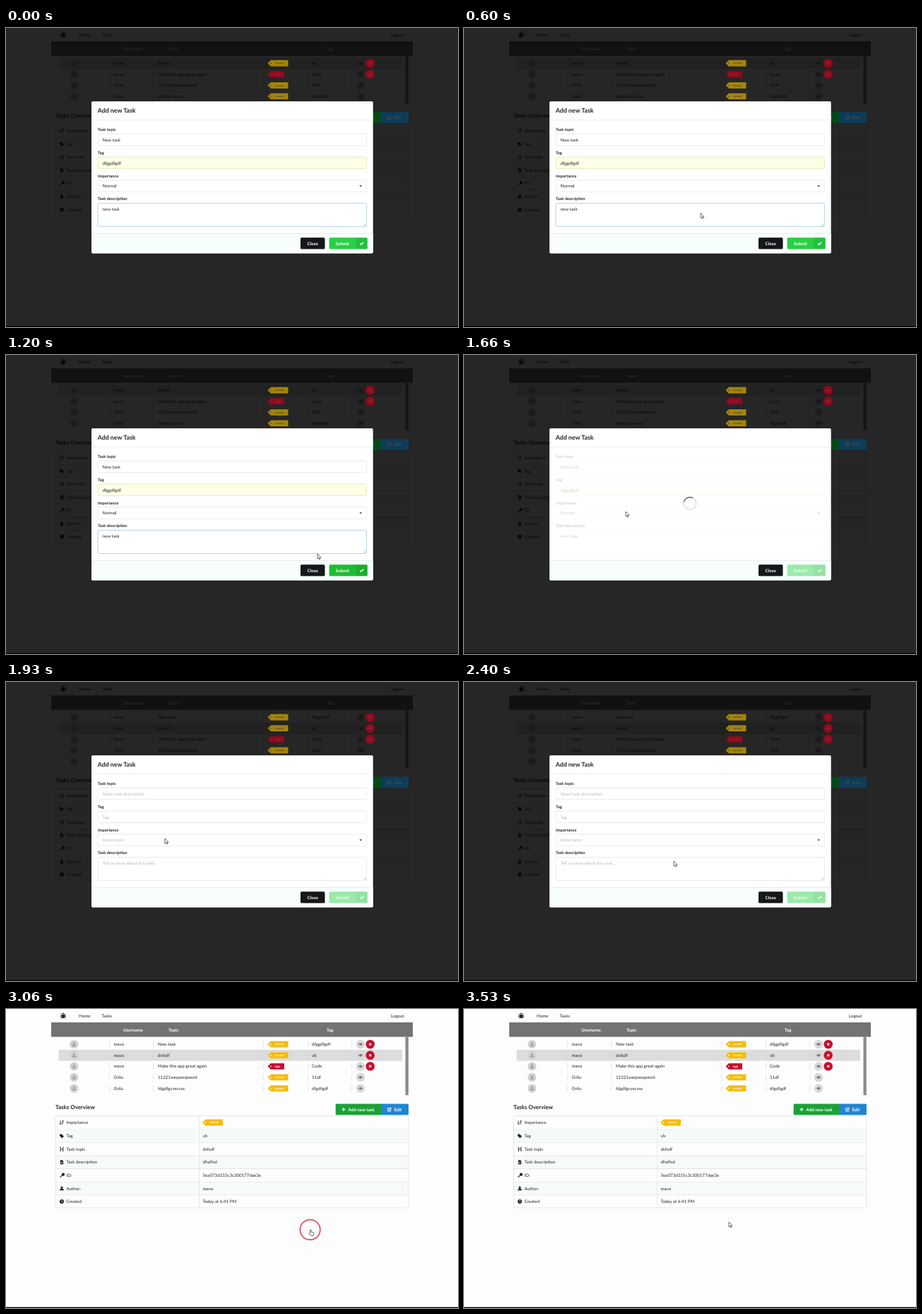
Animation, 640 px wide and 424 px high, one loop 3600 ms. Source, as an HTML page with a canvas:

```html
<!DOCTYPE html>
<html lang="en">
<head>
<meta charset="utf-8">
<title>Task manager</title>
<style>
html, body { margin: 0; width: 100%; height: 100%; overflow: hidden; background: #fdfdfd; }
canvas { display: block; width: 640px; height: 424px; }
</style>
</head>
<body>
<canvas id="stage"></canvas>
<script>
const stage = document.getElementById('stage');
const ratio = window.devicePixelRatio || 1;
stage.width = 640 * ratio;
stage.height = 424 * ratio;
const c = stage.getContext('2d');

const LOOP = 3600, TICK = 1000 / 15;
const INK = '#262626';
const LOAD = 19, SAVED = 28, CLOSED = 46;   // ticks at which the scene changes

const BRIGHT = { yellow: '#f6bd0b', red: '#c8102e', green: '#1da038', blue: '#2185d0', text: '#fff' };
const DIM = { yellow: '#a58408', red: '#97071d', green: '#04491a', blue: '#0d3c5a', text: '#4b4b45' };

const tasks = [
  ['mavo', 'New task', 'dfggdfgdf'],
  ['mavo', 'dsfsdf', 'vb'],
  ['mavo', 'Make this app great again', 'Code', true],
  ['Orilu', '11221weqweqwexit', '11df'],
  ['Orilu', 'fdgdfgcvxcvxc', 'dfgdfgdf']
];

// [tick, x, y] of the pointer tip
const pointerPath = [
  [6, 153, 191], [8, 250, 235], [10, 420, 290], [12, 478, 302], [13, 482, 302], [17, 482, 302],
  [19, 400, 262], [22, 260, 230], [25, 229, 222], [29, 225, 222], [30, 225, 222], [31, 222, 220],
  [35, 222, 220], [36, 297, 254], [38, 370, 290], [40, 420, 315], [43, 430, 312.5], [47, 430, 312.5],
  [49, 412, 310], [52, 382, 306], [53, 375, 302]
];

const icons = {
  sort: ['', 'M-2-2.6V2.6M-3.1 1.4L-2 2.6-.9 1.4M.2-2.2H3M.2-.6H2.4M.2 1H1.8M.2 2.5H1.2'],
  tag: ['M-3-2.6H-.2L3 .4.4 3-3-.3Z', ''],
  heading: ['', 'M-1.8-2.5V2.5M1.8-2.5V2.5M-1.8 0H1.8M-2.6-2.5H-1M1-2.5H2.6M-2.6 2.5H-1M1 2.5H2.6'],
  file: ['M-2.2-3H.8L2.2-1.6V3H-2.2ZM-1.2-.2V.4H1.2V-.2ZM-1.2 1.2V1.8H1.2V1.2Z', ''],
  key: ['M-2.9 2.3L.1-.7A2 2 0 1 1 1.3.6L.2 1.2-.5 1.9-1.3 2-1.4 2.9H-2.9Z', ''],
  user: ['M0-3A1.6 1.6 0 0 1 0 .3 1.6 1.6 0 0 1 0-3M-2.8 2.9C-2.8.4-1.5.4 0 .4S2.8.4 2.8 2.9Z', ''],
  clock: ['M0-3A3 3 0 0 1 0 3 3 3 0 0 1 0-3M-.3-2V.4L1.2 1.3 1.5.8.4 0V-2Z', ''],
  bug: ['M-1.8-2.2A1.8 1.9 0 0 1 1.8-2.2ZM-2.4-1.6H2.4V1.6C2.4 4.6-2.4 4.6-2.4 1.6Z',
    'M-2.2-.9L-4-2.6M2.2-.9L4-2.6M-2 .7H-4.5M2 .7H4.5M-2 2L-3.8 3.8M2 2L3.8 3.8'],
  eye: ['M0-.9A.9.9 0 0 1 0 .9.9.9 0 0 1 0-.9', 'M-2.6 0Q0-3 2.6 0Q0 3-2.6 0'],
  cross: ['', 'M-1.4-1.4L1.4 1.4M1.4-1.4L-1.4 1.4'],
  plus: ['', 'M-2.5 0H2.5M0-2.5V2.5'],
  edit: ['M-.8.1L2-2.8 3-1.8.2 1-1.1 1.3Z', 'M.4-2H-2.6V2.5H1.9V.8'],
  check: ['', 'M-2.5.1L-.8 1.8 2.5-1.7'],
  arrow: ['M0 0V7L1.6 5.6 2.7 8 3.8 7.5 2.8 5.2H5Z', ''],
  hand: ['M.7.5Q1.4-.2 2 .6V3.6L5.2 4.3Q6 4.6 5.8 5.6L5 9H1.8L-.6 6.2Q-.8 5 .7 5.6Z', '']
};

function rect(x, y, w, h, fill, r = 0, border) {
  c.beginPath();
  c.roundRect(x, y, w, h, r);
  if (fill) { c.fillStyle = fill; c.fill(); }
  if (border) { c.strokeStyle = border; c.lineWidth = .6; c.stroke(); }
}

function disc(x, y, r, fill) {
  c.beginPath();
  c.arc(x, y, r, 0, 7);
  c.fillStyle = fill;
  c.fill();
}

function ring(x, y, r, color, width, from = 0, to = 7) {
  c.beginPath();
  c.arc(x, y, r, from, to);
  c.strokeStyle = color;
  c.lineWidth = width;
  c.stroke();
}

// y is the middle of the line of text
function text(s, x, y, color = INK, weight = 400, size = 6.2, align = 'left') {
  c.font = `${weight} ${size}px Lato, sans-serif`;
  c.textAlign = align;
  c.fillStyle = color;
  c.fillText(s, x, y + size * .34);
}
const bold = (s, x, y, color, size, align) => text(s, x, y, color, 700, size, align);

function icon(name, x, y, color = INK, width = .9, outline) {
  const [solid, line] = icons[name];
  c.save();
  c.translate(x, y);
  c.lineWidth = width;
  c.strokeStyle = outline || color;
  c.fillStyle = color;
  const shape = new Path2D(solid);
  c.fill(shape, 'evenodd');
  if (outline) c.stroke(shape);
  c.stroke(new Path2D(line));
  c.restore();
}

function label(x, y, high, p) {
  const end = x + (high ? 23.5 : 29);
  c.beginPath();
  [[x, y], [x + 4.5, y - 4.4], [end, y - 4.4], [end, y + 4.4], [x + 4.5, y + 4.4]]
    .forEach(q => c.lineTo(...q));
  c.fillStyle = high ? p.red : p.yellow;
  c.fill();
  disc(x + 4.2, y, .9, p.text);
  bold(high ? 'high' : 'normal', (x + end) / 2 + 2.2, y, p.text, 3.9, 'center');
}

const rowY = i => 50 + i * 15.65;

// Saturated parts, which stay visible under the dimmer
function accents(rows, dy, p) {
  rows.forEach((task, i) => {
    const y = rowY(i);
    label(370.5, y, task[3], p);
    if (task[0] === 'mavo') {
      disc(515.7, y, 6.3, p.red);
      icon('cross', 515.7, y, p.text, 1.2);
    }
  });
  const y = 142.4 + dy;
  rect(466.7, y - 7.8, 66, 15.6, p.green, 1.5);
  rect(531, y - 7.8, 39, 15.6, p.blue, [0, 1.5, 1.5, 0]);
  icon('plus', 478, y, p.text, 1.2);
  bold('Add new task', 484.5, y, p.text);
  icon('edit', 543, y, p.text);
  bold('Edit', 549.5, y, p.text);
  label(278, 161 + dy, false, p);
}

function page(rows, dy) {
  rect(0, 0, 640, 424, '#fdfdfd');
  icon('bug', 81, 9.5);
  text('Home', 103, 10);
  text('Tasks', 135.5, 10);
  text('Logout', 545, 10);

  rect(64, 19, 512, 20.4, '#737373');
  bold('Username', 166, 29.5, '#fff');
  bold('Topic', 230, 29.5, '#fff');
  bold('Tag', 454, 29.5, '#fff');
  rows.forEach(([name, topic, tag], i) => {
    const y = rowY(i);
    if (topic === 'dsfsdf') rect(74.5, y - 7.8, 486.5, 15.7, '#dcdcdc');
    disc(96.3, y, 6.1, '#d2d2d2');
    icon('user', 96.3, y, '#a4a4a4');
    for (const x of [146.5, 208.5, 364.5, 427.5, 489.5]) rect(x, y - 4.5, .6, 9, '#cfcfcf');
    text(name, 152.5, y);
    text(topic, 215, y);
    text(tag, 433, y);
    disc(502, y, 6.2, '#d8d8d8');
    icon('eye', 502, y, '#555', .8);
  });
  rect(565.5, 39.4, 4.3, 82.8 + dy, '#8a8a8a');

  bold('Tasks Overview', 70, 139.7 + dy, INK, 8);
  const facts = [
    ['sort', 'Importance', ''], ['tag', 'Tag', 'vb'], ['heading', 'Task topic', 'dsfsdf'],
    ['file', 'Task description', 'dfsdfsd'], ['key', 'ID:', '5ea073d315c3c300177dae3e'],
    ['user', 'Author:', 'mavo'], ['clock', 'Created', 'Today at 6:41 PM']
  ];
  facts.forEach(([mark, title, value], i) => {
    const y = (i ? 161.65 + i * 18.55 : 161) + dy;
    if (i % 2) rect(70.3, y - 9.3, 499.5, 18.6, '#f6fbfa');
    if (i) rect(70.3, y - 9.5, 499.5, .6, '#dedede');
    icon(mark, 79, y);
    text(title, 85.5, y);
    text(value, 278.5, y);
  });
  rect(70.3, 151.4 + dy, 499.5, 130.6, null, 1.5, '#d6d6d6');
  rect(273.2, 151.4 + dy, .6, 130.6, '#dedede');
}

function field(title, y, h, value, hint, fill = '#fff', border = '#dcdcdc') {
  bold(title, 130, y - 6, INK, 5.75);
  rect(130, y, 380.4, h, fill, 1.6, border);
  text(value || hint, 136.5, y + 8.4, value ? INK : '#b9b9b9');
}

function modal(k, t) {
  const saved = k >= SAVED, loading = k >= LOAD && !saved;
  const fill = s => saved ? '' : s;
  rect(121, 104, 398.7, 215.6, '#fff', 1.8);
  bold('Add new Task', 129.7, 117.2, INK, 8.8);
  rect(121, 130.4, 398.7, .6, '#dcdcdc');

  field('Task topic', 150.2, 16.5, fill('New task'), 'Short task description');
  field('Tag', 183, 16.5, fill('dfggdfgdf'), 'Tag', saved ? '#fff' : '#fdffe6', saved ? undefined : '#dfdc9e');
  field('Importance', 215.8, 16.5, fill('Normal'), 'Importance');
  field('Task description', 248.5, 33, fill('new task'), 'Tell us more about this task..', '#fff', k < LOAD ? '#85b7d9' : undefined);
  c.fillStyle = INK;
  c.fill(new Path2D('M500.3 223.2H504L502.15 225.2Z'));
  c.strokeStyle = '#888';
  c.lineWidth = .5;
  c.stroke(new Path2D('M506.3 280.5L509.5 277.3M508.2 280.5L509.5 279.2'));

  if (loading) {
    rect(127, 140, 386, 143, 'rgba(255,255,255,.8)');
    const a = (t - 1660) / 600 * 2 * Math.PI;
    ring(320, 210.5, 8.8, '#dedede', 1.5);
    ring(320, 210.5, 8.8, '#6e6e6e', 1.5, a - 2.9, a - 1.1);
  }

  rect(121, 291.3, 398.7, 28.3, '#f8fefd', [0, 0, 1.8, 1.8]);
  rect(121, 291, 398.7, .6, '#dcdcdc');
  rect(417, 297.2, 34.5, 16.4, k >= 42 ? '#27292a' : '#161718', 1.7);
  bold('Close', 434.2, 305.4, '#fff', 6.2, 'center');

  c.save();
  if (k >= LOAD) c.globalAlpha = .45;
  rect(457.6, 297.2, 54.2, 16.4, k >= 12 && k < LOAD ? '#1ebc30' : '#29d046', 1.7);
  rect(495.4, 297.2, 16.4, 16.4, 'rgba(0,0,0,.08)', [0, 1.7, 1.7, 0]);
  c.globalAlpha = k >= LOAD ? .85 : 1;
  bold('Submit', 476.4, 305.4, '#fff', 6.2, 'center');
  icon('check', 503.7, 305.4, '#fff', 1.3);
  c.restore();
}

function pointer(k) {
  if (k < pointerPath[0][0]) return;
  const i = Math.max(1, pointerPath.findIndex(p => p[0] >= k));
  const [k0, x0, y0] = pointerPath[i - 1], [k1, x1, y1] = pointerPath[i];
  const f = (k - k0) / (k1 - k0);
  const x = x0 + (x1 - x0) * f, y = y0 + (y1 - y0) * f;
  const hand = k >= 12 && k <= 17 || k >= 42 && k <= 47;
  icon(hand ? 'hand' : 'arrow', x, y, '#fff', .8, '#444');
}

function clickRing(k, start, x, y) {
  const alpha = [1, .72, .45, .2][k - start];
  if (alpha) ring(x, y, 14.2, `rgba(205,16,42,${alpha})`, 1.7);
}

function draw() {
  const t = performance.now() % LOOP;
  const k = Math.min(53, Math.floor((t + 7) / TICK));
  const saved = k >= SAVED, open = k < CLOSED;
  const rows = saved ? tasks : tasks.slice(1);
  const dy = saved ? 0 : -15.5;

  c.setTransform(ratio, 0, 0, ratio, 0, 0);
  c.textRendering = 'geometricPrecision';
  page(rows, dy);
  if (open) rect(0, 0, 640, 424, 'rgba(0,0,0,.85)');
  accents(rows, dy, open ? DIM : BRIGHT);
  if (open) modal(k, t);
  rect(0, 422.8, 640, 1.2, '#000');
  clickRing(k, 14, 483, 302);
  clickRing(k, 45, 430.6, 313);
  pointer(k);
  requestAnimationFrame(draw);
}
draw();
</script>
</body>
</html>
```
